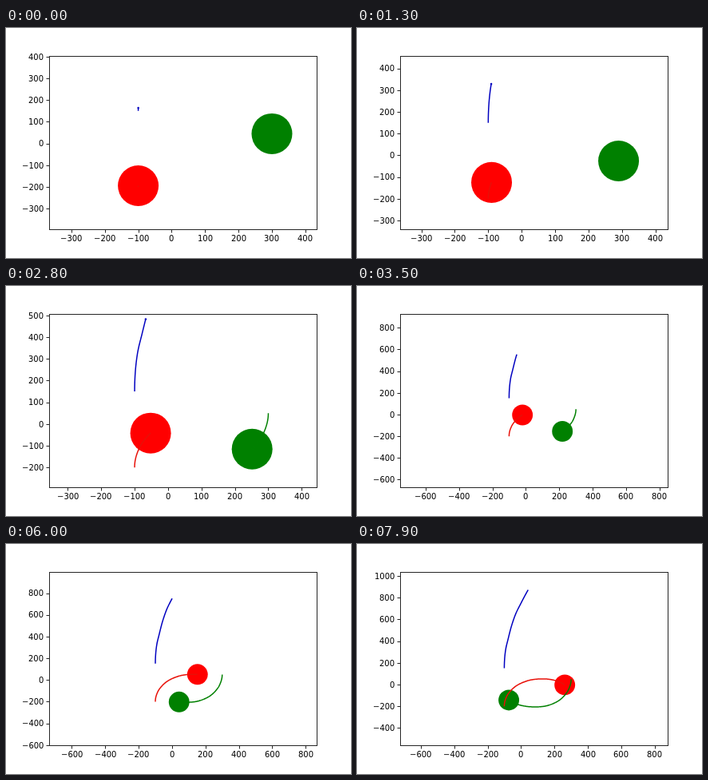
Animation of 432x288 px, one loop 8 s. Source, as an HTML page with a canvas:

```html
<!DOCTYPE html>
<html lang="en">
<head>
<meta charset="utf-8">
<title>Three orbiting bodies</title>
<style>
  html, body { margin: 0; width: 100%; height: 100%; overflow: hidden; background: #fff; }
  canvas { display: block; }
</style>
</head>
<body>
<canvas id="plot" width="432" height="288"></canvas>
<script>
const ctx = document.getElementById('plot').getContext('2d');
const LOOP = 8000, STEP = 100;
const box = { x: 54, y: 34.56, w: 334.8, h: 217.44 };

// Waypoints in seconds and plot units
const times = [-0.1, 1.3, 2.1, 3.5, 4.6, 6, 7.9];
const bodies = [
  { ball: '#ff0000', line: '#e81008', size: 60,
    x: [-100, -90, -75, -20, 49, 152, 262], y: [-200, -125, -82, -4, 39, 51, -3] },
  { ball: '#008000', line: '#008000', size: 60,
    x: [300, 290, 275, 219, 150, 42, -73], y: [50, -26, -72, -155, -197, -203, -143] },
  { ball: '#0000c0', line: '#0000c0', size: 2,
    x: [-100, -91, -78, -55, -33, -1, 41], y: [150, 329, 414, 549, 646, 747, 868] }
];

// Slopes of the parabolas through neighbouring waypoints
function slopes(v) {
  const n = v.length, h = [], s = [], d = [];
  for (let i = 0; i < n - 1; i++) {
    h[i] = times[i + 1] - times[i];
    s[i] = (v[i + 1] - v[i]) / h[i];
  }
  for (let i = 1; i < n - 1; i++) {
    d[i] = (s[i - 1] * h[i] + s[i] * h[i - 1]) / (h[i - 1] + h[i]);
  }
  d[0] = 2 * s[0] - d[1];
  d[n - 1] = 2 * s[n - 2] - d[n - 2];
  return d;
}

function hermite(v, d, t) {
  let i = 0;
  while (i < times.length - 2 && t > times[i + 1]) i++;
  const h = times[i + 1] - times[i], u = (t - times[i]) / h, w = 1 - u;
  return v[i] * w * w * (1 + 2 * u) + v[i + 1] * u * u * (3 - 2 * u)
    + h * u * w * (d[i] * w - d[i + 1] * u);
}

for (const b of bodies) {
  b.dx = slopes(b.x);
  b.dy = slopes(b.y);
}

const place = (b, t) => ({ x: hermite(b.x, b.dx, t), y: hermite(b.y, b.dy, t) });
const mean = (pts, k) => pts.reduce((sum, p) => sum + p[k], 0) / pts.length;

// The view follows the mean position and doubles once a body leaves it
function viewAt(pts) {
  const cx = mean(pts, 'x'), cy = mean(pts, 'y');
  const out = pts.some(p => Math.abs(p.x - cx) > 400 || Math.abs(p.y - cy) > 400);
  const half = out ? 800 : 400;
  const sx = box.w / half / 2, sy = box.h / half / 2;
  return {
    cx, cy, half, sx,
    px: x => box.x + box.w / 2 + (x - cx) * sx,
    py: y => box.y + box.h / 2 - (y - cy) * sy
  };
}

function ticks(center, half, draw) {
  const step = half / 4;
  for (let v = Math.ceil((center - half) / step) * step; v <= center + half; v += step) {
    draw(v, v < 0 ? '\u2212' + -v : String(Math.abs(v)));
  }
}

function drawAxes(view) {
  ctx.strokeStyle = 'rgba(0,0,0,0.85)';
  ctx.fillStyle = '#000';
  ctx.lineWidth = 1;
  ctx.font = '10px "DejaVu Sans", sans-serif';
  ctx.textBaseline = 'alphabetic';
  ctx.textAlign = 'left';
  ctx.strokeRect(54.5, 35.5, 335, 217);
  ctx.beginPath();
  ticks(view.cx, view.half, (v, label) => {
    const x = Math.round(view.px(v)) + 0.5;
    ctx.moveTo(x, 253);
    ctx.lineTo(x, 256.5);
    ctx.fillText(label, Math.round(view.px(v) - ctx.measureText(label).width / 2), 267);
  });
  ticks(view.cy, view.half, (v, label) => {
    const y = Math.round(view.py(v)) + 0.5;
    ctx.moveTo(50.5, y);
    ctx.lineTo(54, y);
    ctx.fillText(label, Math.round(47 - ctx.measureText(label).width), Math.round(view.py(v) + 3.8));
  });
  ctx.stroke();
}

function drawBall(b, p, view) {
  ctx.fillStyle = b.ball;
  ctx.beginPath();
  ctx.arc(view.px(p.x), view.py(p.y), b.size * view.sx + 0.4, 0, 2 * Math.PI);
  ctx.fill();
}

function drawTrail(b, t, view) {
  ctx.strokeStyle = b.line;
  ctx.lineWidth = 1.5;
  ctx.lineJoin = 'round';
  ctx.beginPath();
  const n = Math.max(2, Math.ceil((t - times[0]) / 0.05));
  for (let i = 0; i <= n; i++) {
    const p = place(b, times[0] + (t - times[0]) * i / n);
    ctx.lineTo(view.px(p.x), view.py(p.y));
  }
  ctx.stroke();
}

function render(t) {
  const pts = bodies.map(b => place(b, t));
  const view = viewAt(pts);
  ctx.fillStyle = '#fff';
  ctx.fillRect(0, 0, 432, 288);
  ctx.save();
  ctx.beginPath();
  ctx.rect(box.x, box.y, box.w, box.h);
  ctx.clip();
  bodies.forEach((b, i) => drawBall(b, pts[i], view));
  bodies.forEach(b => drawTrail(b, t, view));
  ctx.restore();
  drawAxes(view);
}

const start = performance.now();
function tick() {
  const ms = (performance.now() - start) % LOOP;
  render(Math.floor(ms / STEP) * STEP / 1000);
  requestAnimationFrame(tick);
}
tick();
</script>
</body>
</html>
```
